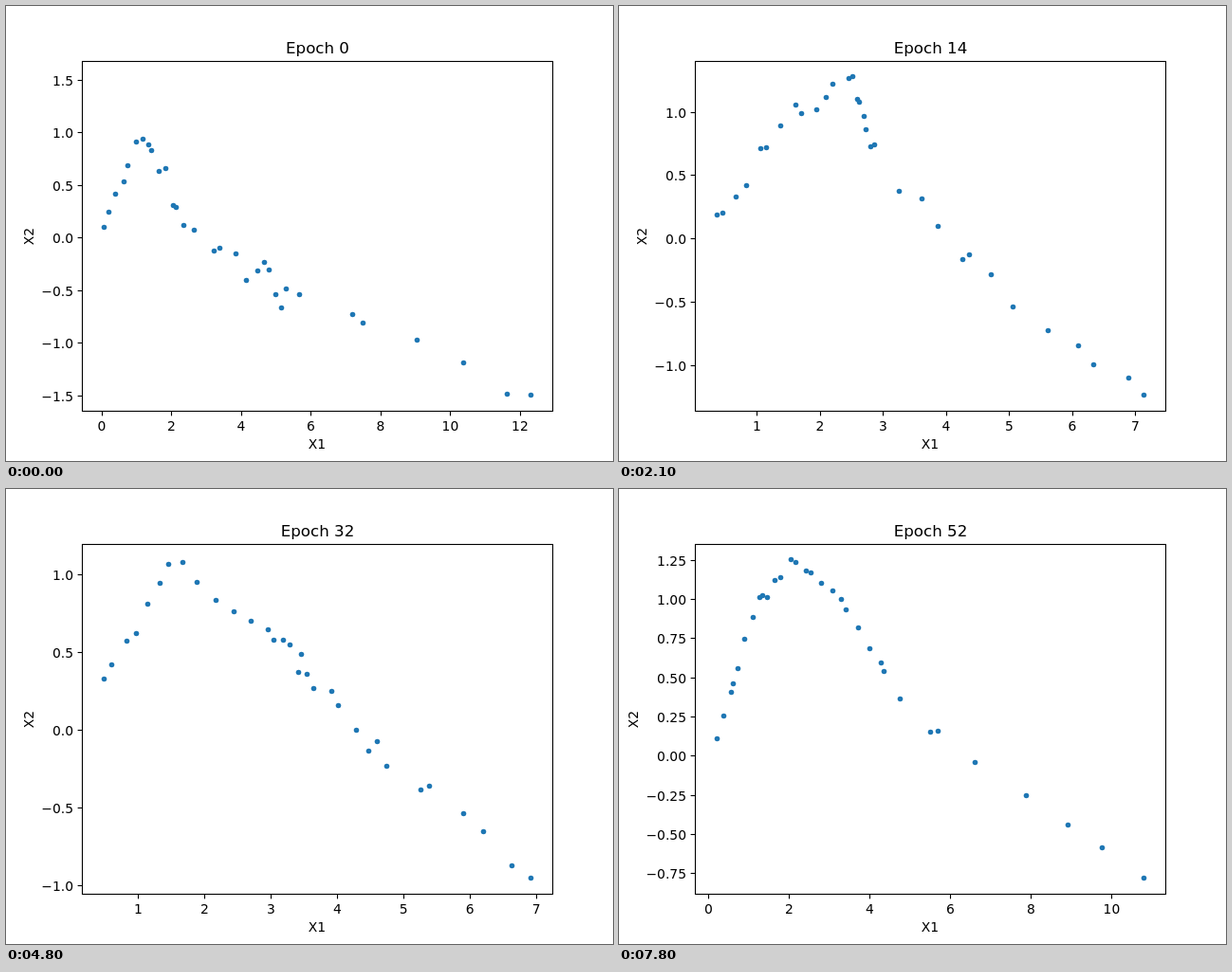
Recreate the animation shown at these times as an HTML page. Size 640 by 480 pixels, loop 8 s.

```html
<!DOCTYPE html>
<html lang="en">
<head>
<meta charset="utf-8">
<title>Scatter by epoch</title>
<style>
  html, body { margin: 0; width: 100%; height: 100%; overflow: hidden; background: #fff; }
  svg { display: block; width: 640px; height: 480px; }
  text { font-family: "DejaVu Sans", sans-serif; font-size: 13.89px; fill: #000; }
  .title { font-size: 16.67px; }
  .mid { text-anchor: middle; }
  .end { text-anchor: end; }
  .line { fill: none; stroke: #000; stroke-width: 1.11; }
  .dot { fill: #1f77b4; }
</style>
</head>
<body>
<svg id="stage" viewBox="0 0 640 480"></svg>
<script>
const LOOP = 8000, STEP = 300, DOTS = 32;
const LEFT = 80, RIGHT = 576, TOP = 57.6, BOTTOM = 427.2;
const DOT_TOP = 74, DOT_BOTTOM = 410;
const stage = document.getElementById('stage');

function add(parent, tag, attrs, text) {
  const el = document.createElementNS('http://www.w3.org/2000/svg', tag);
  for (const key in attrs) el.setAttribute(key, attrs[key]);
  if (text !== undefined) el.textContent = text;
  parent.appendChild(el);
  return el;
}

// x and y: pixel of zero and pixels per unit. The dots scatter around the curve.
const keys = [
  { epoch: 0, x: [100.5, 36.75], y: [244.4, 111], spread: 28,
    curve: [[103, 233], [144, 133], [183, 225], [261, 280], [300, 310], [553, 410]] },
  { epoch: 4, x: [87.5, 38.27], y: [154.6, 86.7], spread: 18,
    curve: [[103, 133], [153, 95], [206, 130], [270, 195], [370, 295], [553, 410]] },
  { epoch: 14, x: [78.5, 66.5], y: [245.1, 133.6], spread: 14,
    curve: [[103, 220], [171, 123], [245, 76], [266, 154], [394, 290], [553, 410]] },
  { epoch: 28, x: [90.75, 67.7], y: [278.4, 189], spread: 22,
    curve: [[103, 255], [190, 75], [330, 180], [385, 240], [440, 310], [553, 410]] },
  { epoch: 38, x: [36.7, 73.3], y: [218.3, 126.8], spread: 8,
    curve: [[103, 117], [149, 74], [201, 115], [231, 135], [344, 260], [553, 410]] },
  { epoch: 44, x: [82.6, 58.5], y: [218.6, 130.6], spread: 6,
    curve: [[103, 175], [134, 117], [165, 74], [280, 190], [350, 250], [553, 410]] },
  { epoch: 52, x: [94, 42.5], y: [281.25, 165.1], spread: 8,
    curve: [[103, 263], [141, 130], [181, 74], [237, 121], [302, 236], [553, 410]] },
];

const lerp = (a, b, t) => a + (b - a) * t;
const mix = (a, b, t) => a.map((v, i) => lerp(v, b[i], t));
const clamp = (v, lo, hi) => Math.max(lo, Math.min(hi, v));

function seeded(seed) {
  let s = seed * 7919 + 17;
  return () => {
    s = (s + 0x6D2B79F5) | 0;
    let r = Math.imul(s ^ (s >>> 15), 1 | s);
    r = (r + Math.imul(r ^ (r >>> 7), 61 | r)) ^ r;
    return ((r ^ (r >>> 14)) >>> 0) / 4294967296;
  };
}

// Axes and curve at an epoch, blended from the keys on either side.
function plotAt(epoch) {
  const next = Math.max(1, keys.findIndex(k => k.epoch >= epoch));
  const a = keys[next - 1], b = keys[next];
  const t = (epoch - a.epoch) / (b.epoch - a.epoch);
  return {
    x: mix(a.x, b.x, t),
    y: mix(a.y, b.y, t),
    spread: lerp(a.spread, b.spread, t),
    curve: a.curve.map((p, i) => mix(p, b.curve[i], t)),
  };
}

function scatter(plot, epoch) {
  const rnd = seeded(epoch), last = plot.curve.length - 1;
  return Array.from({ length: DOTS }, (_, i) => {
    const loose = i > 0 && i < DOTS - 1 ? 1 : 0;
    const u = (i + loose * 0.9 * (rnd() - 0.5)) / (DOTS - 1) * last;
    const seg = Math.min(Math.floor(u), last - 1);
    const [x, y] = mix(plot.curve[seg], plot.curve[seg + 1], u - seg);
    const off = loose * plot.spread * (rnd() + rnd() - 1);
    return [Math.round(x), Math.round(clamp(y + off, DOT_TOP, DOT_BOTTOM))];
  });
}

// Round tick values: the finest step that leaves at most nine gaps.
function ticks(lo, hi) {
  const steps = [0.1, 0.2, 0.25, 0.5, 1, 2, 2.5, 5];
  const step = steps.find(s => (hi - lo) / s <= 9);
  const digits = step % 1 === 0 ? 0 : step === 0.25 ? 2 : 1;
  const list = [];
  for (let i = Math.ceil(lo / step); i * step <= hi; i++) {
    list.push({ value: i * step, label: (i * step).toFixed(digits).replace('-', '\u2212') });
  }
  return list;
}

const charWidth = c => c === '\u2212' ? 11.64 : c === '.' ? 4.41 : 8.84;
const labelWidth = s => [...s].reduce((sum, c) => sum + charWidth(c), 0);

add(stage, 'rect', { width: 640, height: 480, fill: '#fff' });
const body = add(stage, 'g', {});
add(stage, 'rect', { class: 'line', x: 80.5, y: 58.5, width: 496, height: 369 });
add(stage, 'text', { class: 'mid', x: 328, y: 467 }, 'X1');
const title = add(stage, 'text', { class: 'title mid', x: 328.5, y: 50 });
const yName = add(stage, 'text', { class: 'mid' }, 'X2');

function draw(epoch) {
  const plot = plotAt(epoch);
  const [x0, xUnit] = plot.x, [y0, yUnit] = plot.y;
  body.textContent = '';
  title.textContent = 'Epoch ' + epoch;

  for (const [x, y] of scatter(plot, epoch)) {
    add(body, 'circle', { class: 'dot', cx: x + 0.5, cy: y + 0.5, r: 2.78 });
  }
  for (const t of ticks((LEFT - x0) / xUnit, (RIGHT - x0) / xUnit)) {
    const x = x0 + t.value * xUnit;
    add(body, 'path', { class: 'line', d: `M${Math.round(x) + 0.5} 427.5v4.9` });
    add(body, 'text', { class: 'mid', x: x + 0.4, y: 448 }, t.label);
  }
  let widest = 0;
  for (const t of ticks((y0 - BOTTOM) / yUnit, (y0 - TOP) / yUnit)) {
    const y = Math.round(y0 - t.value * yUnit);
    add(body, 'path', { class: 'line', d: `M80.5 ${y + 0.5}h-4.9` });
    add(body, 'text', { class: 'end', x: 71, y: y + 6 }, t.label);
    widest = Math.max(widest, labelWidth(t.label));
  }
  yName.setAttribute('transform', `translate(${Math.round(62.6 - widest)} 243) rotate(-90)`);
}

let shown = -1;
function tick() {
  const epoch = 2 * Math.floor(performance.now() % LOOP / STEP);
  if (epoch !== shown) draw(shown = epoch);
  requestAnimationFrame(tick);
}
tick();
</script>
</body>
</html>
```
